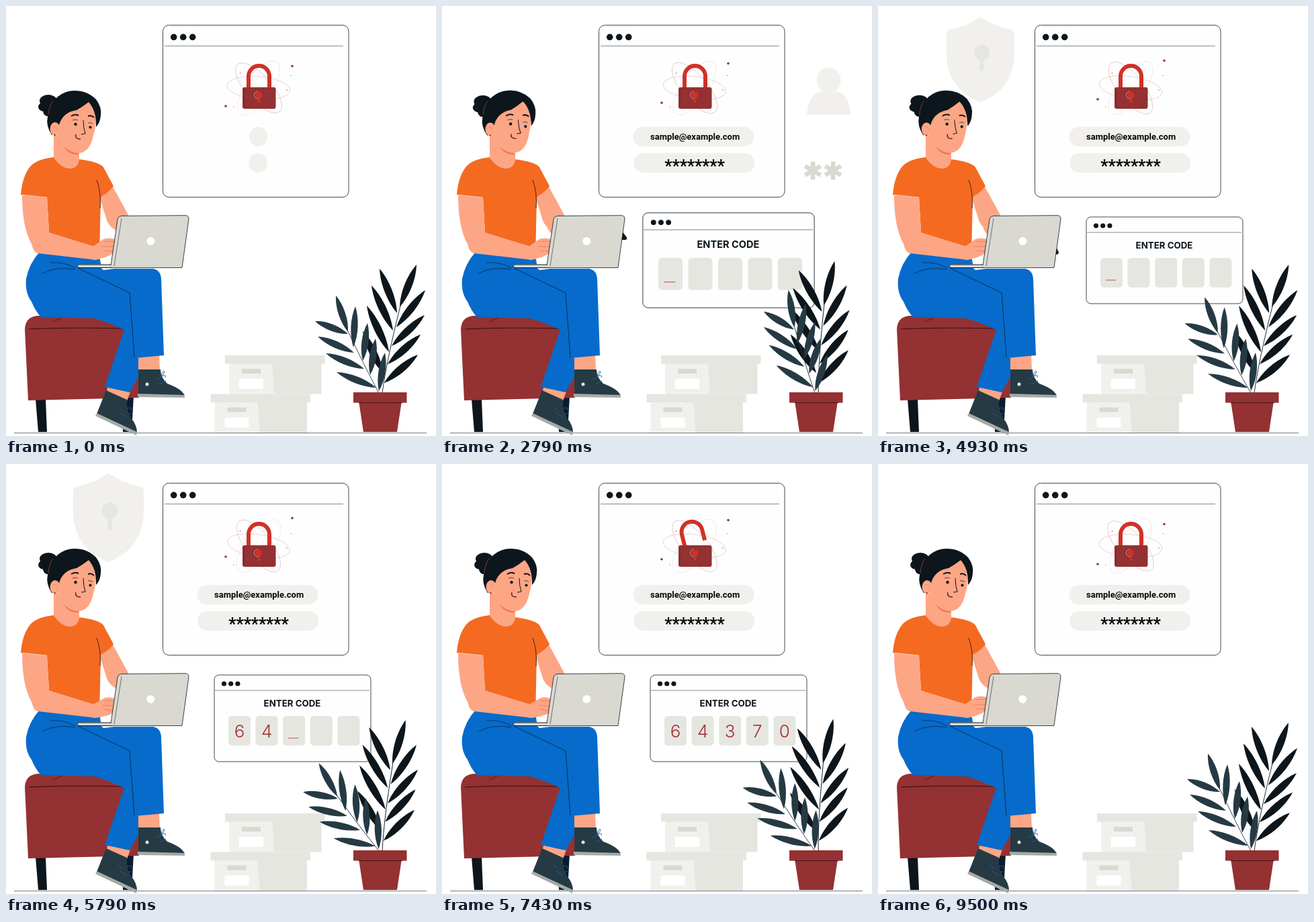
An HTML page with a canvas for the animation above (9.57 s loop, 640 by 640 pixels).

```html
<!DOCTYPE html>
<html lang="en">
<head>
<meta charset="utf-8">
<title>Two-step sign in</title>
<style>
html, body { margin: 0; width: 100%; height: 100%; overflow: hidden; background: #fff; }
canvas { display: block; width: 640px; height: 640px; }
</style>
</head>
<body>
<canvas id="stage"></canvas>
<script>
const LOOP = 9570;
const INK = '#0c161c', SLATE = '#263a44', RED = '#943132', BRIGHT = '#d03128', SKIN = '#fda685',
      ORANGE = '#f46a21', BLUE = '#066bcb', PALE = '#f1f0ed', GREY = '#e6e6e1', STONE = '#d9d9d2';
const CODE = '64370', EMAIL = 'sample@example.com';

const canvas = document.getElementById('stage');
const ratio = window.devicePixelRatio || 1;
canvas.width = canvas.height = 640 * ratio;
const c = canvas.getContext('2d');

// Eased value from alternating time, value pairs.
function key(t, ...k) {
  if (t <= k[0]) return k[1];
  for (let i = 2; i < k.length; i += 2) {
    if (t < k[i]) {
      const u = (t - k[i - 2]) / (k[i] - k[i - 2]);
      return k[i - 1] + (k[i + 1] - k[i - 1]) * (1 - Math.cos(u * Math.PI)) / 2;
    }
  }
  return k[k.length - 1];
}

function fill(d, color) { c.fillStyle = color; c.fill(new Path2D(d)); }
function line(d, color = INK, width = 0.8) {
  c.strokeStyle = color; c.lineWidth = width; c.stroke(new Path2D(d));
}
function rect(x, y, w, h, color, r = 0) {
  c.beginPath(); c.roundRect(x, y, w, h, r); c.fillStyle = color; c.fill();
}
function oval(x, y, rx, ry, color) {
  c.beginPath(); c.ellipse(x, y, rx, ry, 0, 0, 7); c.fillStyle = color; c.fill();
}
function dot(x, y, r, color) { oval(x, y, r, r, color); }
function text(s, x, y, font, color, align = 'center') {
  c.font = font; c.fillStyle = color; c.textAlign = align; c.fillText(s, x, y);
}
function at(x, y, degrees, scale, draw) {
  if (scale < 0.002) return;
  c.save();
  c.translate(x, y); c.rotate(degrees * Math.PI / 180); c.scale(scale, scale); c.translate(-x, -y);
  draw();
  c.restore();
}
function frame(x, y, w, h, r) {
  c.beginPath(); c.roundRect(x, y, w, h, r);
  c.fillStyle = '#fefefe'; c.fill();
  c.strokeStyle = '#30363a'; c.lineWidth = 0.9; c.stroke();
}

function orbits(t) {
  const drift = key(t, 0, 0, 6000, 1, LOOP, 0);
  c.lineWidth = 0.6;
  [[5, 17, '#dfb4b4'], [48, 19, '#d8a5a5'], [-56, 20, '#d9c5c5']].forEach(([angle, ry, color], i) => {
    c.beginPath();
    c.ellipse(376, 122, 47, ry, (angle + drift * 4) * Math.PI / 180, 0, 7);
    c.strokeStyle = color;
    c.setLineDash(i === 2 ? [1.5, 1] : []);
    c.stroke();
  });
  c.setLineDash([]);
  dot(426, 89.5 - 9 * drift, 1.8, RED);
  dot(327, 149 - 11 * drift, 1.8, RED);
  dot(424.5, 103.5, 0.6, RED);
  dot(348.5, 100, 0.7, RED);
  dot(418, 125, 0.7, RED);
  dot(339, 150, 0.6, RED);
}

function lock(t) {
  const open = key(t, 7000, 0, 7300, -14, 8250, -14, 8600, 0);
  at(361, 121, open, 1, () => line('M361 122V104.5a15.5 15.5 0 0 1 31 0V121', BRIGHT, 6));
  rect(352, 121, 49.5, 32, RED, 3);
  line('M354.5 123V151', '#702126', 0.8);
  line('M375 127a5.5 5.5 0 0 0 0 11', '#d9aaa6', 0.8);
  dot(376.5, 132.5, 4.8, BRIGHT);
  rect(375, 133, 3, 11, BRIGHT, 1);
}

function loginWindow(t) {
  frame(233.5, 28.5, 276.5, 256, 9);
  for (let i = 0; i < 3; i++) dot(249.7 + i * 14, 46.3, 4.8, INK);
  line('M236 59.5H502', '#6a6f71', 0.8);
  orbits(t);
  lock(t);
  const w = key(t, 0, 27, 600, 180);
  rect(374.5 - w / 2 + (180 - w) / 120, 180, w, 29, PALE, Math.min(14.5, w / 2));
  rect(375.3 - w / 2, 219, w, 29, PALE, Math.min(14.5, w / 2));
  const letters = Math.max(0, Math.floor((t - 620) / 32));
  text(EMAIL.slice(0, letters), 310, 198.5, '700 13px Roboto, sans-serif', '#050607', 'left');
  const stars = Math.min(8, Math.max(0, Math.floor((t - 1240) / 80)));
  for (let i = 0; i < stars; i++)
    text('*', 337 + i * 11.15, 247, '700 25px Roboto, sans-serif', '#050607');
}

function sideIcons(t) {
  const gone = key(t, 3300, 1, 3700, 0);
  at(575.5, 128, 0, key(t, 700, 0, 1050, 1) * gone, () => {
    oval(575.5, 110.5, 18, 19, PALE);
    fill('M543 162Q545 128 567 127H584Q606 128 608 162Z', PALE);
  });
  [1250, 2050, 2790].forEach((start, i) => {
    const x = 552 + i * 30;
    at(x, 245, 0, key(t, start, 0, start + 190, 1) * gone, () => {
      for (let a = 0; a < 3; a++)
        at(x, 245, a * 60, 1, () => rect(x - 3.3, 231.5, 6.6, 27, STONE));
    });
  });
}

function shield(t) {
  let scale = key(t, 3550, 0, 4300, 1.09);
  if (t > 4300) scale = 1 + 0.09 * Math.cos((t - 4300) / 1987 * 2 * Math.PI);
  if (t > 6287) scale = key(t, 6287, 1.09, 6900, 0);
  at(152.5, 80, 0, scale, () => {
    fill('M152.5 14Q176 29 201 34Q205 35 205 41V76Q202 126 152.5 146Q103 126 100 76V41Q100 35 104 34Q129 29 152.5 14Z', PALE);
    dot(154.5, 69, 12, GREY);
    rect(151.5, 75, 6, 23, GREY, 2.5);
  });
}

function codeWindow(t) {
  const scale = key(t, 2350, 0, 2750, 1.1, 3050, 1, 8150, 1, 8350, 1.08, 8750, 0);
  const typed = [5200, 5600, 6000, 6350, 6700].filter(s => t >= s).length;
  at(426.5, 378.5, 0, scale, () => {
    frame(310, 314, 233, 129, 7);
    for (let i = 0; i < 3; i++) dot(324.5 + i * 10.2, 327, 3.6, INK);
    line('M311 337H541', '#6a6f71', 0.8);
    text('ENTER CODE', 426, 361.3, '700 13.3px Inter, sans-serif', INK);
    for (let i = 0; i < 5; i++) {
      const x = 331 + i * 40.6;
      rect(x, 375, 33, 44, GREY, 5);
      if (i < typed) text(CODE[i], x + 16.5, 406.5, '300 26px Inter, sans-serif', '#a52f31');
      if (i === typed) rect(x + 8, 407.5, 15, 1, '#c64a48');
    }
  });
}

function bubble(t) {
  at(226, 229, 0, key(t, 3250, 0, 3550, 1.08, 3700, 1, 4450, 1, 4750, 0), () => {
    const d = 'M168 153.5H282Q287 153.5 287 159V211Q287 216 282 216H235L226 229L217 216H169Q163.5 216 163.5 211V159Q163.5 153.5 168 153.5Z';
    fill(d, '#fff');
    line(d, '#30363a');
    text('YOUR CODE', 225, 169.5, '700 8px Inter, sans-serif', INK);
    rect(175, 175, 101, 30, PALE, 4);
    [...CODE].forEach((n, i) => text(n, 191.5 + i * 17.2, 197, '300 22px Inter, sans-serif', '#b03638'));
  });
}

function phoneArm(t) {
  const swing = key(t, 2550, 78, 2790, 59, 3300, 0, 4400, 0, 5060, 78);
  if (swing > 77) return;
  at(166, 326, swing, 1, () => {
    fill('M150 322L177 306Q193 302 198 290L210 276Q218 274 226 274Q229 288 220 297Q205 310 178 334Q160 342 150 322Z', SKIN);
    fill('M192 291L222 246Q224 243 228 243L238 242Q241 243 240 246L211 290Q209 293 206 293H196Q192 293 192 291Z', INK);
    line('M200 290L231 246', '#3d4c55', 0.7);
    fill('M204 292Q203 284 211 283L220 276Q227 274 227 280L222 285Q227 286 221 291Q222 296 214 299Z', SKIN);
    line('M211 285L222 283M210 290L221 290', '#d5745b', 0.7);
  });
}

function stool() {
  fill('M44 585H59L61 634H48Z', INK);
  fill('M172 580H190L187 634H174Z', '#0b1c2e');
  fill('M28 481Q29 462 48 461L132 464L176 480L198 520V583L33 587Z', RED);
  line('M34 481Q90 478 175 480', '#2a1216', 1);
}

function legs() {
  fill('M196 522L228 518L229 543H197Z', SKIN);
  fill('M197 541H230Q230 553 240 562Q262 570 266 580H197Z', SLATE);
  fill('M196 577L266 579V583L196 582Z', '#a5aaa7');
  dot(210, 563, 2.5, '#e8e8e4');
  line('M230 551Q235 540 236 545Q235 549 230 551Q240 548 237 553M224 556L233 552M229 563L238 558', '#1e5f9f', 0.9);

  fill('M152 564L185 574L180 588L149 577Z', SKIN);
  fill('M149 572L180 586Q179 602 186 613Q195 624 195 635L135 607Z', SLATE);
  fill('M135 606L195 634L194 639L133 610Z', '#a5aaa7');
  line('M180 599Q189 596 186 602M166 597L174 603M170 606L180 612M181 608L187 606', '#1e5f9f', 0.9);

  fill('M50 366L140 377L142 391H219Q230 393 231 406L235 520L191 524L197 524V552L184 575L147 567L176 482Q155 472 132 465L52 463Q43 453 38 440Q28 427 30 406Q34 384 50 366Z', BLUE);
  line('M107 390L184 427L191 523', '#0d2944', 0.9);
  line('M66 382Q86 380 103 390M54 398Q75 387 103 392M70 470L83 464', '#0d2944', 0.8);
}

function head(t) {
  at(90, 215, key(t, 2550, 0, 3300, -8.5, 4350, -8.5, 5130, 0), 1, () => {
    oval(63, 141, 13, 9, INK);
    oval(57, 150, 9, 7, INK);
    oval(62, 156, 7, 8, INK);
    fill('M70 158L79 200Q91 219 109 219Q125 217 130 193Q136 172 134 152L122 136L104 137Z', SKIN);
    fill('M68 192Q59 178 62 165Q65 145 77 135Q88 126 102 126Q121 126 134 139Q143 151 141 163Q140 174 134 180Q135 156 123 143Q114 150 105 155Q86 158 80 174L76 188Z', INK);
    oval(73, 183, 7.5, 10, SKIN);
    line('M71 180Q75 178 76 184', '#ef8060', 0.8);
    dot(72.5, 192, 1.2, RED);
    line('M70 141Q64 149 63 162', '#a83b39', 0.8);
    dot(103.5, 176, 2.2, INK);
    dot(125.5, 180.5, 2.1, INK);
    line('M97 164Q102 160 108 163M122 164Q127 162 131 166', INK, 2);
    line('M99 170Q103 168 107 170M122 174Q126 173 129 175', INK, 0.7);
    line('M115 170Q115 181 118 190L112 191', INK, 1);
    line('M104 191Q102 198 111 198', '#5e1d23', 1.4);
  });
}

function torso(t) {
  fill('M139 284L158 267L182 311L165 334Q154 330 150 319Z', SKIN);
  fill('M71 225Q45 228 36 239Q24 254 22 281L61 285L64 337L100 368L139 377L141 284Q155 276 160 268L145 240Q139 232 108 228Z', ORANGE);
  line('M135 259Q142 278 140 301', '#2a2020', 0.9);
  fill('M71 190L109 205V229Q107 242 94 242Q82 241 71 226Z', SKIN);
  fill('M85 207Q96 219 108 219V221Q92 222 85 207Z', '#f37550');
  fill('M24 281L61 285L64 337L132 358L135 378L47 368Q41 367 38 354Q24 330 24 281Z', SKIN);
  line('M24 281L61 285', '#fbd8c6', 0.7);
  const typing = t < 7950 && (t < 2500 || t > 5050);
  const tap = typing && Math.floor(t / 140) % 3 === 2 ? 5 : 0;
  at(132, 367, tap, 1, () => {
    fill('M129 358L145 347Q151 344 162 347L163 366Q149 376 130 378Z', SKIN);
    line('M145 351Q153 349 162 351M143 358L161 358M146 364L160 365', '#dd7a60', 0.8);
  });
}

function laptop() {
  fill('M142 390H169L145 393Z', '#fff');
  rect(106, 384.5, 55, 5, STONE, 2.5);
  line('M158 389.5H109Q106 389 106 387Q106 385 109 385H156', INK, 0.9);
  const lid = 'L166 318Q167 312.5 173 312.5L267 311.7Q272 312 272 317L262 389.5';
  fill('M156 389' + lid + 'H158Z', STONE);
  line('M156 386' + lid + 'H108', INK, 0.8);
  line('M172 316L161 387', '#3f4444', 0.7);
  dot(215.3, 350, 6, '#fff');
}

function box(x, y) {
  rect(x + 65, y + 12, 78.5, 45.5, GREY);
  fill(`M${x + 6} ${y + 12}h64l3 45.5h-67z`, PALE);
  rect(x, y, 148.5, 12.5, GREY);
  rect(x + 25, y + 20, 28, 7, STONE);
  rect(x + 21, y + 35, 36, 15, '#fff');
}

// Almond leaf from base (x, y) to tip (u, v).
function leaf([x, y, u, v], width, color) {
  const dx = u - x, dy = v - y, n = Math.hypot(dx, dy), px = -dy / n * width, py = dx / n * width;
  const side = s => [x + dx * 0.3 + px * s, y + dy * 0.3 + py * s, x + dx * 0.7 + px * s, y + dy * 0.7 + py * s];
  c.beginPath();
  c.moveTo(x, y);
  c.bezierCurveTo(...side(1), u, v);
  const [a, b, e, f] = side(-1);
  c.bezierCurveTo(e, f, a, b, x, y);
  c.fillStyle = color;
  c.fill();
}

const TALL = [[586, 448, 611, 385], [581, 478, 624, 423], [574, 506, 623, 460], [568, 533, 617, 489], [563, 561, 613, 519],
              [582, 457, 556, 391], [576, 483, 544, 416], [570, 515, 537, 446], [561, 546, 531, 484]];
const LOW = [[509, 485, 491, 431], [509, 488, 460, 469], [518, 516, 464, 492], [533, 540, 476, 517], [551, 568, 492, 545],
             [517, 508, 520, 447], [531, 528, 538, 472], [542, 549, 550, 495], [555, 573, 564, 516]];

function plant(t) {
  const tall = key(t, 0, 15, 2100, 5, 4500, 15.9, 6900, 5.6, LOOP, 15) - 15;
  const low = key(t, 0, -24, 3600, -13.2, 6000, -35, LOOP, -24) + 24;
  at(560, 575, tall, 1, () => {
    TALL.forEach(l => leaf(l, 7.4, INK));
    line('M560 576Q566 530 587 446', INK, 0.9);
  });
  at(555, 575, low, 1, () => {
    LOW.forEach(l => leaf(l, 6.8, SLATE));
    line('M555 576Q533 535 509 484', SLATE, 0.9);
  });
  fill('M525 588H589L582 634H532Z', RED);
  rect(517, 575, 79.5, 15.5, RED);
  line('M525 590.5H590', '#35161a', 0.9);
}

function draw(t) {
  c.setTransform(ratio, 0, 0, ratio, 0, 0);
  c.fillStyle = '#fff';
  c.fillRect(0, 0, 640, 640);
  loginWindow(t);
  sideIcons(t);
  shield(t);
  line('M12 635.5H626', '#777b7b', 1);
  box(326, 520);
  box(304.5, 577.5);
  codeWindow(t);
  stool();
  phoneArm(t);
  legs();
  torso(t);
  head(t);
  laptop();
  bubble(t);
  plant(t);
}

const start = performance.now();
function tick() {
  draw((performance.now() - start) % LOOP);
  requestAnimationFrame(tick);
}
tick();
</script>
</body>
</html>
```
